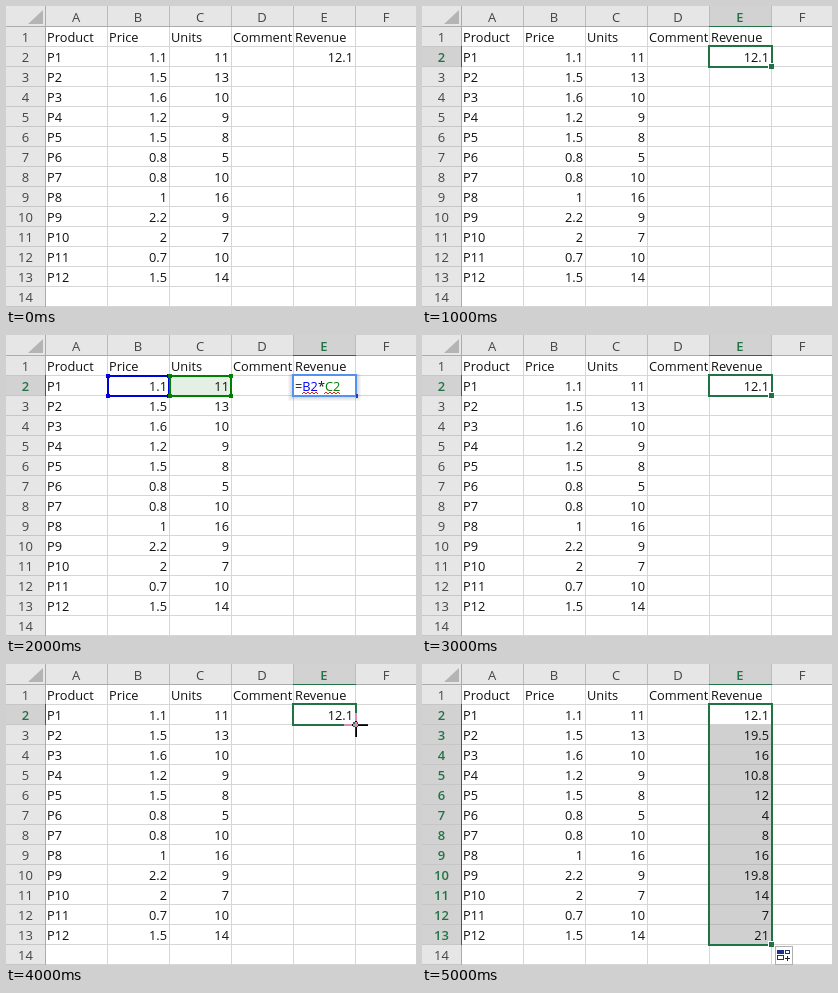
An HTML page that plays this animation: 410x301 px, repeating every 6000 ms.

```html
<!DOCTYPE html>
<html lang="en">
<head>
<meta charset="utf-8">
<title>Fill a formula down</title>
<style>
html, body { margin: 0; width: 100%; height: 100%; overflow: hidden; background: #fff; }
svg { display: block; width: 410px; height: 301px; isolation: isolate; }
text { font: 12.8px "Open Sans", "Noto Sans", sans-serif; fill: #111; }
.head { fill: #444; text-anchor: middle; font-size: 13px; }
.on { fill: #217346; font-weight: 600; }
.num { text-anchor: end; }
rect { shape-rendering: crispEdges; }
.cursor { mix-blend-mode: difference; }
</style>
</head>
<body>
<svg id="sheet" viewBox="0 0 410 301"></svg>
<script>
const svg = document.getElementById('sheet');
const LEFT = 39, COL = 62, ROW = 20, GREEN = '#217346';
const titles = ['Product', 'Price', 'Units', 'Comment', 'Revenue'];
const price = [1.1, 1.5, 1.6, 1.2, 1.5, 0.8, 0.8, 1, 2.2, 2, 0.7, 1.5];
const units = [11, 13, 10, 9, 8, 5, 10, 16, 9, 7, 10, 14];

const colX = c => LEFT + c * COL;
const rowY = r => r * ROW;
const box = (x, y, w, h, fill, extra = '') =>
  `<rect x="${x}" y="${y}" width="${w}" height="${h}" fill="${fill}" ${extra}/>`;
const frame = (x, y, w, h, color) =>
  box(x, y, w, h, 'none', `stroke="${color}" stroke-width="2"`);
const text = (x, y, s, cls = '') => `<text x="${x}" y="${y}" class="${cls}">${s}</text>`;
const label = (c, r, s) => text(colX(c) + 2, rowY(r) + 16, s);
const number = (c, r, v) => text(colX(c + 1) - 2, rowY(r) + 16, +v.toFixed(2), 'num');

function headers(lastRow) {
  const active = r => r >= 2 && r <= lastRow;
  let s = box(0, 0, 410, 20, '#e6e6e6') + box(0, 20, 39, 281, '#e6e6e6');
  if (lastRow) {
    s += box(colX(4), 0, COL, 20, '#d2d2d2') + box(0, 40, 39, (lastRow - 1) * ROW, '#d2d2d2');
  }
  s += '<path d="M37 4V18H22Z" fill="#b4b4b4"/>';
  for (let c = 0; c < 6; c++) {
    s += box(colX(c), 0, 1, 20, '#bcbcbc');
    s += text(colX(c) + 31, 16, 'ABCDEF'[c], lastRow && c === 4 ? 'head on' : 'head');
  }
  s += box(colX(6), 0, 1, 20, '#bcbcbc');
  for (let r = 1; r <= 14; r++) {
    s += box(0, rowY(r + 1), 39, 1, '#c6c6c6');
    s += text(19.5, rowY(r) + 16, r, active(r) ? 'head on' : 'head');
  }
  s += box(0, 20, 410, 1, '#ababab') + box(39, 0, 1, 301, '#ababab');
  if (lastRow) {
    s += box(colX(4), 20, COL + 1, 1, GREEN) + box(39, 40, 1, (lastRow - 1) * ROW + 1, GREEN);
  }
  return s;
}

function grid() {
  let s = '';
  for (let c = 1; c < 6; c++) s += box(colX(c), 21, 1, 280, '#d6d6d6');
  for (let r = 2; r <= 15; r++) s += box(40, rowY(r), 370, 1, '#d6d6d6');
  return s;
}

function values(lastRow, editing) {
  let s = titles.map((t, c) => label(c, 1, t)).join('');
  price.forEach((p, i) => {
    const r = i + 2;
    s += label(0, r, 'P' + (i + 1)) + number(1, r, p) + number(2, r, units[i]);
    if (r <= lastRow && !editing) s += number(4, r, p * units[i]);
  });
  return s;
}

function selection(lastRow) {
  const bottom = rowY(lastRow + 1);
  return frame(287, 40, 63, bottom - 39, GREEN) +
    box(346, bottom - 3, 6, 6, '#fff') + box(347, bottom - 2, 5, 5, GREEN);
}

function reference(c, color) {
  const x = colX(c);
  let s = frame(x + 1, 41, 61, 20, color);
  for (const [dx, dy] of [[-1, 39], [60, 39], [-1, 59], [60, 59]]) s += box(x + dx, dy, 4, 4, color);
  return s;
}

function squiggle(x) {
  let d = `M${x} 59`;
  for (let i = 1; i <= 8; i++) d += `L${x + 2 * i} ${i % 2 ? 57 : 59}`;
  return `<path d="${d}" fill="none" stroke="#e02020"/>`;
}

function editor() {
  let s = '';
  for (let i = 4; i > 0; i--) {
    s += box(286 - i, 39, 65 + 2 * i, 23 + i, '#000', 'rx="2" fill-opacity=".035"');
  }
  s += box(286, 39, 65, 23, '#fff') + frame(287, 40, 63, 21, '#5292f0');
  s += box(350, 59, 2, 4, '#1d3fb0');
  s += text(289, 56, '=<tspan fill="#00f">B2</tspan>*<tspan fill="#008000">C2</tspan>');
  return s + squiggle(296) + squiggle(318);
}

const cross = () => '<g class="cursor">' +
  box(338, 60, 24, 2, '#fff') + box(349, 49, 2, 11, '#fff') + box(349, 62, 2, 11, '#fff') + '</g>';

function fillOptions() {
  return box(353.5, 282.5, 17, 18, '#fff', 'stroke="#b0b0b0"') +
    box(355, 286, 7, 4, '#1f2f87') + box(363.5, 286.5, 4, 3, '#fff', 'stroke="#1f2f87"') +
    box(355.5, 291.5, 6, 4, '#fff', 'stroke="#1f2f87"') +
    box(363, 294, 5, 1, '#222') + box(365, 292, 1, 5, '#222');
}

function draw(step) {
  const editing = step === 2, filled = step === 5;
  const last = filled ? 13 : 2;
  let s = box(0, 0, 410, 301, '#fff');
  if (editing) s += box(164, 41, 61, 19, '#e5f0e5');
  s += grid();
  if (filled) {
    s += box(287, 60, 62, 220, '#d0d0d0');
    for (let r = 4; r < 14; r++) s += box(287, rowY(r), 62, 1, '#bababa');
  }
  s += headers(step ? last : 0) + values(last, editing);
  if (editing) s += reference(1, '#0000d8') + reference(2, '#008000') + editor();
  else if (step) s += selection(last);
  if (step === 4) s += cross();
  if (filled) s += fillOptions();
  svg.innerHTML = s;
}

let shown = -1;
const start = performance.now();
function tick() {
  const step = Math.floor((performance.now() - start) / 1000) % 6;
  if (step !== shown) draw(shown = step);
  requestAnimationFrame(tick);
}
tick();
</script>
</body>
</html>
```
